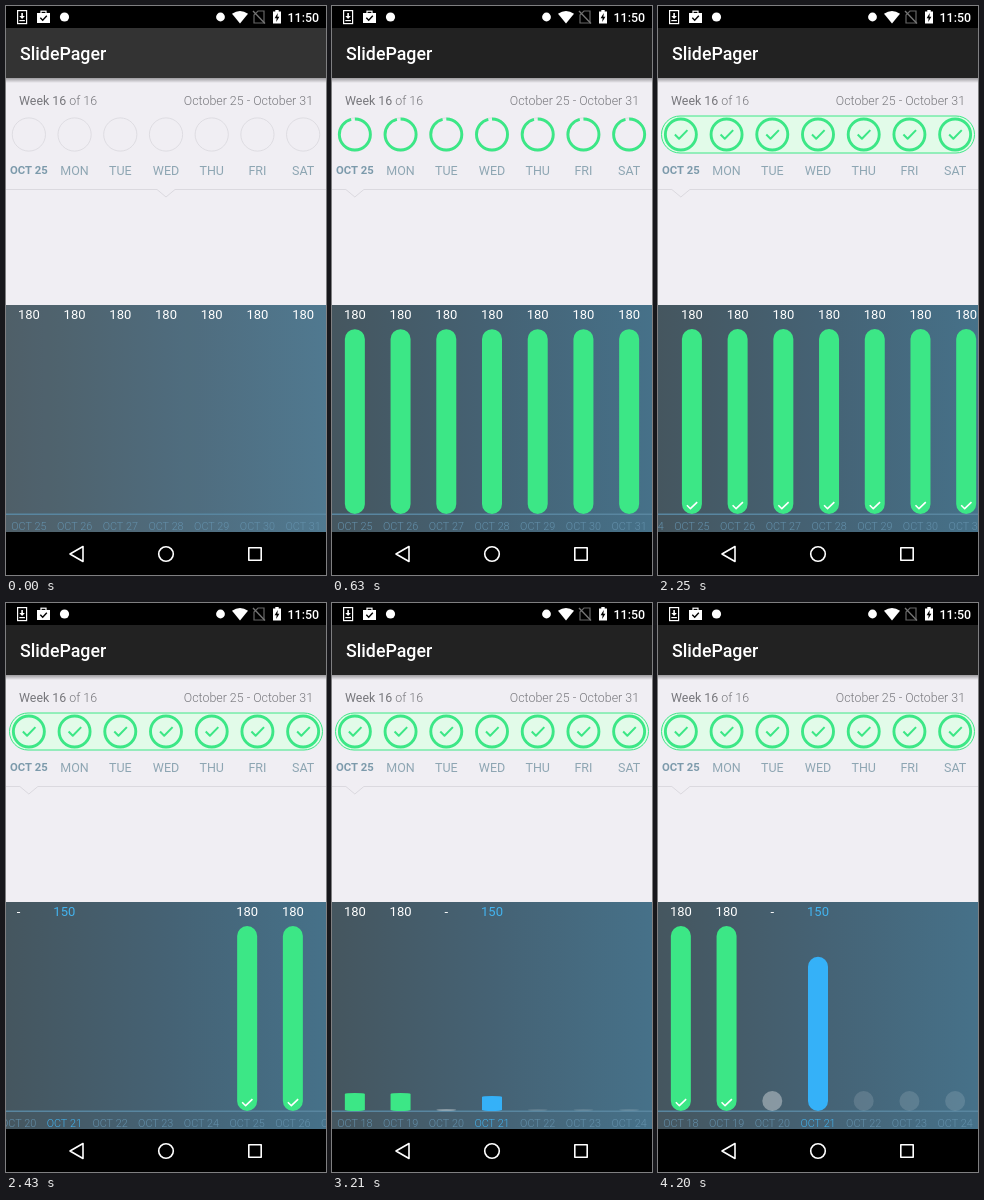
Write an HTML page with a canvas that moves like this. It is 320x569 px and loops after 5180 ms.

```html
<!DOCTYPE html>
<html lang="en">
<head>
<meta charset="utf-8">
<title>SlidePager</title>
<style>
html, body { margin: 0; width: 100%; height: 100%; overflow: hidden; background: #000; }
canvas { display: block; width: 320px; height: 569px; }
</style>
</head>
<body>
<canvas id="stage"></canvas>
<script>
const LOOP = 5180, STEP = 30, W = 320, H = 569, COL = W / 7;
const GREEN = '#3ce786', BLUE = '#35b1f8';
const canvas = document.getElementById('stage');
const ctx = canvas.getContext('2d');
const dpr = window.devicePixelRatio || 1;
canvas.width = W * dpr;
canvas.height = H * dpr;

const clamp = v => Math.min(1, Math.max(0, v));
const colX = i => COL * (i + 0.5);
const easeInOut = v => (1 - Math.cos(Math.PI * clamp(v))) / 2;

// S-curve with a long tail, zero at t = 0
const logistic = t => 1 / (1 + Math.exp(-0.0197 * (t - 260)));
const grow = t => t <= 0 ? 0 : (logistic(t) - logistic(0)) / (1 - logistic(0));

// Drag followed by a fling, settles after 540 ms
const surge = t => 1 - Math.exp(-Math.pow(t / 195, 1.79));
const slide = t => W * surge(Math.min(540, Math.max(0, t))) / surge(540);

function rect(x, y, w, h, fill) {
  ctx.fillStyle = fill;
  ctx.fillRect(x, y, w, h);
}

function text(str, x, y, size, weight, color, align = 'center') {
  ctx.font = `${weight} ${size}px Roboto, sans-serif`;
  ctx.textAlign = align;
  ctx.fillStyle = color;
  ctx.fillText(str, x, y);
}

function line(points, color, width, close) {
  ctx.beginPath();
  points.forEach(([x, y]) => ctx.lineTo(x, y));
  if (close) ctx.closePath();
  ctx.strokeStyle = color;
  ctx.lineWidth = width;
  ctx.stroke();
}

function ring(x, y, r, part, color, width) {
  ctx.beginPath();
  ctx.arc(x, y, r, -Math.PI / 2, Math.PI * (2 * part - 0.5));
  ctx.strokeStyle = color;
  ctx.lineWidth = width;
  ctx.stroke();
}

function disc(x, y, r, fill) {
  ctx.beginPath();
  ctx.arc(x, y, r, 0, 7);
  ctx.fillStyle = fill;
  ctx.fill();
}

function poly(points, fill) {
  ctx.beginPath();
  points.forEach(([x, y]) => ctx.lineTo(x, y));
  ctx.fillStyle = fill;
  ctx.fill();
}

function statusBar() {
  rect(0, 0, W, 22, '#000');
  ctx.lineJoin = 'miter';
  // download
  ctx.strokeStyle = '#fff';
  ctx.lineWidth = 1.2;
  ctx.strokeRect(11.6, 4.6, 9, 13);
  rect(15.3, 7, 1.6, 4, '#fff');
  poly([[13.3, 10], [18.9, 10], [16.1, 13]], '#fff');
  rect(13.3, 14, 5.6, 1.2, '#fff');
  // bag with tick
  ctx.strokeRect(35, 5.2, 5, 3);
  rect(31, 7, 13, 10, '#fff');
  line([[34.3, 11.8], [36.7, 14.2], [40.8, 9.8]], '#000', 1.4);
  disc(58.5, 11, 4.6, '#fff');
  disc(214.5, 11, 4.4, '#fff');
  // wifi
  ctx.beginPath();
  ctx.moveTo(234, 17.5);
  ctx.lineTo(226, 7.8);
  ctx.quadraticCurveTo(234, 2, 242, 7.8);
  ctx.fillStyle = '#fff';
  ctx.fill();
  // no SIM
  line([[248, 17], [248, 9], [252, 5], [258, 5], [258, 17]], '#666', 1.2, true);
  line([[247, 5], [259, 17.5]], '#777', 1.3);
  // battery
  rect(267, 5.5, 8, 12, '#fff');
  rect(269.3, 4, 3.4, 2, '#fff');
  poly([[271.8, 7], [268.6, 12.2], [270.6, 12.2], [270.2, 16], [273.4, 10.8], [271.4, 10.8]], '#000');
  text('11:50', 313, 15.5, 12.4, 500, '#fff', 'right');
}

function navBar() {
  rect(0, 526, W, 43, '#000');
  ctx.lineJoin = 'round';
  line([[64, 548], [77, 540.5], [77, 555.5]], '#fff', 1.6, true);
  ring(160, 548, 7.3, 1, '#fff', 1.6);
  line([[242.8, 541.8], [255.2, 541.8], [255.2, 554.2], [242.8, 554.2]], '#fff', 1.6, true);
}

function actionBar(fade) {
  const shadow = ctx.createLinearGradient(0, 72, 0, 77);
  shadow.addColorStop(0, 'rgba(0,0,0,.35)');
  shadow.addColorStop(1, 'rgba(0,0,0,0)');
  rect(0, 72, W, 5, shadow);
  rect(0, 22, W, 50, '#222');
  rect(0, 22, W, 50, `rgba(255,255,255,${fade})`);
  text('SlidePager', 14, 54, 17.8, 500, '#fff', 'left');
}

function week(t) {
  text('Week 16', 13, 98.5, 12.4, 400, '#77777c', 'left');
  text('of 16', 91, 98.5, 12.4, 300, '#77777c', 'right');
  text('October 25 - October 31', 307, 98.5, 12.4, 300, '#77777c', 'right');

  if (t >= 1200) {
    ctx.beginPath();
    ctx.roundRect(3.5, 110, 313, 37, 18.5);
    ctx.fillStyle = '#e2fbe9';
    ctx.fill();
    ctx.strokeStyle = GREEN;
    ctx.lineWidth = 1;
    ctx.stroke();
  }

  const part = easeInOut(t / 720);
  ['OCT 25', 'MON', 'TUE', 'WED', 'THU', 'FRI', 'SAT'].forEach((day, i) => {
    const x = colX(i), y = 128.5;
    if (part < 1) ring(x, y, 16.6, 1, '#d6d4da', 0.7);
    if (part > 0) ring(x, y, 15.5, part, GREEN, 2.9);
    ctx.globalAlpha = clamp((t - 720) / 180);
    line([[x - 6, y], [x - 1.8, y + 4.2], [x + 6.6, y - 4.4]], GREEN, 2);
    ctx.globalAlpha = 1;
    if (i) text(day, x, 168.5, 12.5, 400, '#8ea6b3');
    else text(day, x, 167.5, 11.3, 700, '#7c9aab');
  });

  const notch = t < STEP ? 160 : colX(0);
  line([[0, 183.5], [notch - 9, 183.5], [notch, 191], [notch + 9, 183.5], [W, 183.5]], '#dbd9df', 1);
}

function bar(x, height, scale, color, tick) {
  if (scale <= 0) return;
  ctx.save();
  ctx.translate(x, 508);
  ctx.scale(1, scale);
  ctx.beginPath();
  ctx.roundRect(-10, -height, 20, height, 10);
  ctx.fillStyle = color;
  ctx.fill();
  ctx.restore();
  ctx.globalAlpha = tick;
  line([[x - 5, 499.3], [x - 1.5, 502.7], [x + 5.3, 496.2]], '#fff', 1.6);
  ctx.globalAlpha = 1;
}

// A value is minutes, '-' for a missed day or '' for a day to come
function page(left, firstDay, values, scale, tick) {
  values.forEach((value, i) => {
    const x = left + colX(i), partial = value === 150;
    if (value > 0) bar(x, 185 * value / 180, scale, partial ? BLUE : GREEN, partial ? 0 : tick);
    else bar(x, 20, scale, value ? 'rgba(255,255,255,.36)' : 'rgba(255,255,255,.13)', 0);
    text(value, x, 313, 13, 400, partial ? '#43b3ee' : '#fff');
    text('OCT ' + (firstDay + i), x, 523.5, 10.8, 300, partial ? '#43b3ee' : '#6390ab');
  });
}

function chart(t, fade) {
  const tint = ctx.createLinearGradient(0, 0, W, 0);
  tint.addColorStop(0, '#45565f');
  tint.addColorStop(0.5, '#456274');
  tint.addColorStop(1, '#467189');
  rect(0, 299, W, 227, tint);
  rect(0, 299, W, 227, `rgba(255,255,255,${fade * 0.7})`);
  rect(0, 507.5, W, 1.5, '#5986a0');
  const shift = slide(t - 2220);
  if (shift < W) page(shift, 25, Array(7).fill(180), grow(t), t >= 1200 ? 1 : 0);
  if (shift > 0) {
    const tick = t >= 4200 ? 1 : t >= 4170 ? 0.5 : 0;
    page(shift - W, 18, [180, 180, '-', 150, '', '', ''], grow(t - 3060), tick);
  }
}

function draw(now) {
  const t = Math.floor(now % LOOP / STEP) * STEP;
  const fade = 0.077 * clamp(1 - t / 240);
  ctx.setTransform(dpr, 0, 0, dpr, 0, 0);
  rect(0, 0, W, H, '#f0eef3');
  actionBar(fade);
  week(t);
  chart(t, fade);
  statusBar();
  navBar();
}

const start = performance.now();
function tick() {
  draw(performance.now() - start);
  requestAnimationFrame(tick);
}
tick();
</script>
</body>
</html>
```
